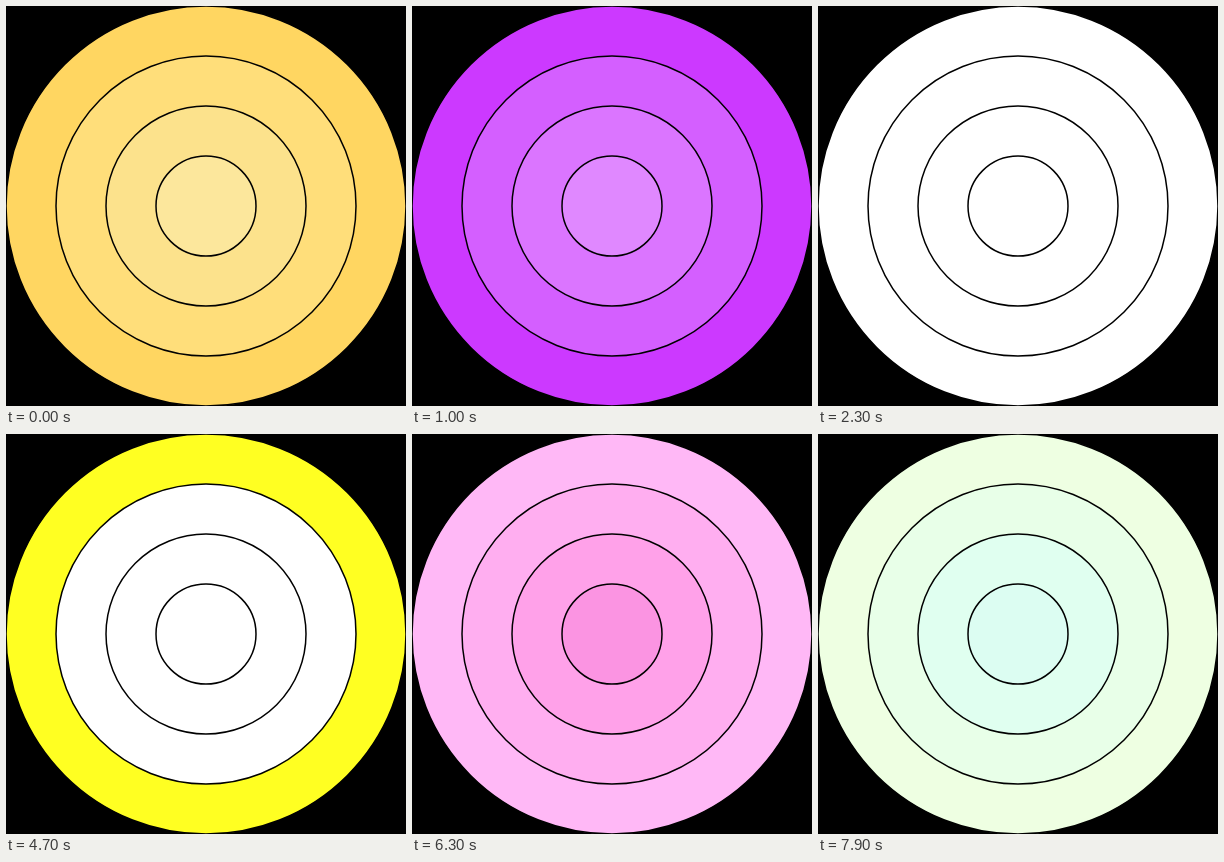
An HTML page that plays this animation: 400x400 px, repeating every 8000 ms.

```html
<!DOCTYPE html>
<html lang="en">
<head>
<meta charset="utf-8">
<title>Colour rings</title>
<style>
  html, body { margin: 0; width: 100%; height: 100%; overflow: hidden; background: #000; }
  svg { display: block; width: 100vw; height: 100vh; }
  circle { fill: #fff; stroke: #000; stroke-width: 1.5; }
</style>
</head>
<body>
<svg viewBox="0 0 400 400">
  <circle cx="200" cy="200" r="200"/>
  <circle cx="200" cy="200" r="150"/>
  <circle cx="200" cy="200" r="100"/>
  <circle cx="200" cy="200" r="50"/>
</svg>
<script>
const LOOP = 8000, STEP = 100;
const rings = [...document.querySelectorAll('circle')];

// Each pulse crosses the rings one step at a time; fade maps age in steps to colour.
const pulses = [
  { start: -400, outward: true, hold: 500,
    fade: [[1, 'ffd661'], [2, 'ffde7a'], [3, 'fce28c'], [4, 'fce79c'], [9, 'fef4d0']] },
  { start: 700, outward: true, hold: 1400,
    fade: [[0, 'cc39ff'], [1, 'd45fff'], [2, 'db75ff'], [3, 'e088ff'], [7, 'eebdff']] },
  { start: 1600, outward: true, hold: 2300,
    fade: [[0, 'a8f8ff'], [2, 'e0fff0'], [4, 'ffffff']] },
  { start: 4700, outward: false, hold: 5500,
    fade: [[0, 'ffff22'], [1, 'ffff51'], [2, 'fdfd6a'], [3, 'ffff80'], [4, 'ffff92'], [5, 'fffe9f'], [8, 'ffffc1']] },
  { start: 5600, outward: false, hold: 6300,
    fade: [[0, 'ff38c6'], [2, 'ff73d4'], [4, 'fb94e2'], [5, 'ffa1e9'], [6, 'ffaef0'], [7, 'ffb8f6'], [10, 'ffd2fa']] },
  { start: 6500, outward: false, hold: 7300,
    fade: [[0, 'a8f8ff'], [5, 'dcfdf2'], [6, 'e0fff0'], [7, 'e8ffe8'], [8, 'eeffe2']] }
];

const rgb = hex => [0, 2, 4].map(i => parseInt(hex.slice(i, i + 2), 16));

function fadeColor(fade, age) {
  const next = fade.findIndex(([at]) => at >= age);
  if (next < 0) return rgb(fade[fade.length - 1][1]);
  if (next === 0) return rgb(fade[0][1]);
  const [t0, c0] = fade[next - 1], [t1, c1] = fade[next];
  const k = (age - t0) / (t1 - t0), end = rgb(c1);
  return rgb(c0).map((v, i) => Math.round(v + (end[i] - v) * k));
}

function ringColor(index, time) {
  let color = [255, 255, 255];
  for (const { start, outward, fade } of pulses) {
    const delay = outward ? rings.length - 1 - index : index;
    const age = (time - start) / STEP - delay;
    if (age >= 0) color = fadeColor(fade, age);
  }
  return `rgb(${color})`;
}

function draw(ms) {
  let time = Math.floor(ms / STEP) * STEP;
  const current = pulses.filter(p => p.start <= time).pop();
  time = Math.min(time, current.hold);
  rings.forEach((ring, i) => { ring.style.fill = ringColor(i, time); });
}

const began = performance.now();
function tick() {
  draw((performance.now() - began) % LOOP);
  requestAnimationFrame(tick);
}
tick();
</script>
</body>
</html>
```
